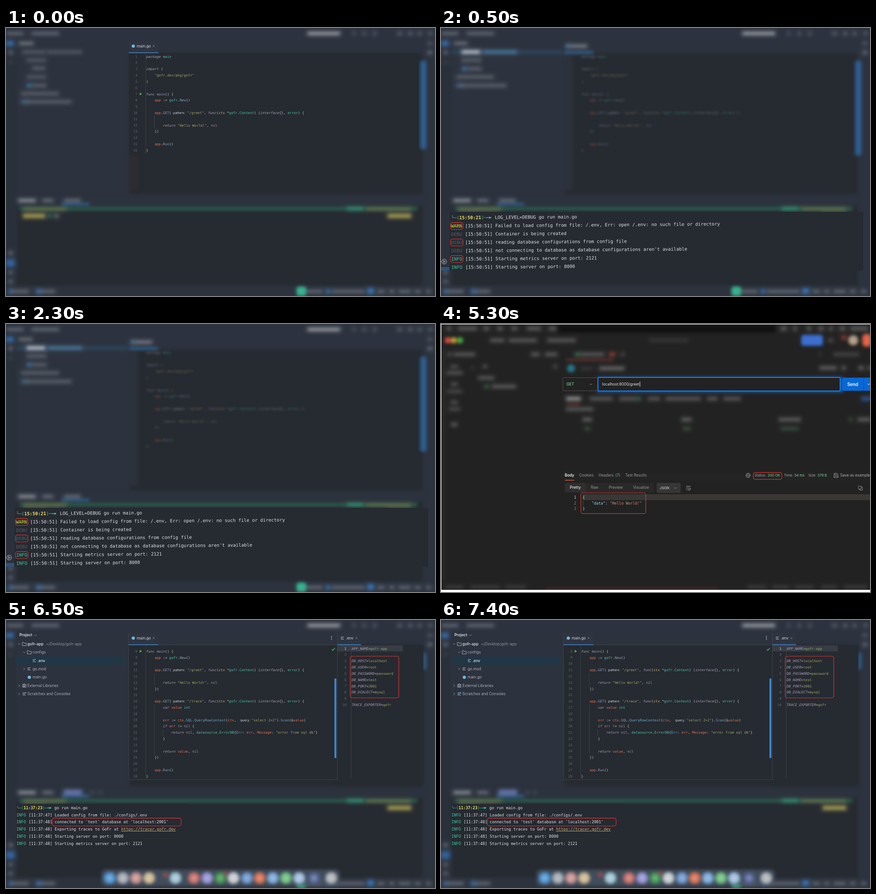
Recreate the animation shown at these times as an HTML page. Size 947 by 592 pixels, loop 8 s.

```html
<!DOCTYPE html>
<html lang="en">
<head>
<meta charset="utf-8">
<title>Go service walkthrough</title>
<style>
  html, body { margin: 0; width: 100%; height: 100%; overflow: hidden; background: #2d333e; }
  svg { position: absolute; left: 0; top: 0; width: 947px; height: 592px; }
  text { white-space: pre; font-family: Inter, sans-serif; }
  .mono, .mono text { font-family: "DejaVu Sans Mono", monospace; }
  .hint { font: 7.2px Inter, sans-serif; }
  .soft { filter: blur(3.5px); }
  .code-soft { filter: blur(2.6px); opacity: .6; }
</style>
</head>
<body>
<script>
const LOOP = 8000;
const PANEL = '#2d333e', EDITOR = '#262a31', RED = '#e03535', BLUE = '#3d86cc';
const GREY = '#9299a5', TEXT = '#c9ced6';
const INK = {
  k: '#aaa0b4', w: '#bcc2cd', o: '#e2734f', g: '#4ac6a8', y: '#a3a867',
  b: '#8b9fbd', c: '#d0b36c', p: '#d2d6dd', l: '#a39aad', m: '#6dabc9'
};

// Drawing helpers; text is placed by the middle of its capitals.
const esc = s => String(s).replace(/&/g, '&amp;').replace(/</g, '&lt;');
const rect = (x, y, w, h, fill, more = '') =>
  `<rect x="${x}" y="${y}" width="${w}" height="${h}" fill="${fill}" ${more}/>`;
const text = (x, y, s, fill = TEXT, size = 8.3, more = '') =>
  `<text x="${x}" y="${y + size * .36}" font-size="${size}" fill="${fill}" ${more}>${esc(s)}</text>`;
const mono = (x, y, s, fill, size, more = '') => text(x, y, s, fill, size, `class="mono" ${more}`);
const path = (d, stroke = GREY, w = 1, more = 'fill="none"') =>
  `<path d="${d}" stroke="${stroke}" stroke-width="${w}" ${more}/>`;
const dot = (x, y, r, fill, more = '') => `<circle cx="${x}" cy="${y}" r="${r}" fill="${fill}" ${more}/>`;
const outline = (x, y, w, h) => rect(x, y, w, h, 'none', `rx="4" stroke="${RED}" stroke-width="1.2"`);
const soft = (...parts) => `<g class="soft">${parts.join('')}</g>`;
const down = (x, y, c = GREY, r = 2.5) => path(`M${x - r} ${y - r / 2}l${r} ${r}l${r} ${-r}`, c);
const right = (x, y) => path(`M${x - 1.2} ${y - 2.5}l2.5 2.5l-2.5 2.5`);
const lines = (x, y) => path(`M${x} ${y - 2.5}h7M${x} ${y}h5M${x} ${y + 2.5}h7`, '#aeb4be');
const folder = (x, y) => path(`M${x} ${y - 3.5}h3l1.4 1.6h4.4v5.6h-8.8z`, '#aeb4be');
const cross = (x, y) => path(`M${x - 2} ${y - 2}l4 4m0 -4l-4 4`, '#858c98', .8);

// Smudges on one row, given as "from-to" spans.
const smudge = (y, spans, fill = '#8d939e', alpha = .42, h = 7) => spans.split(' ').map(s => {
  const [a, b] = s.split('-').map(Number);
  return rect(a - 7, y - h / 2 - 6, b - a + 14, h + 12, fill, `rx="8" opacity="${alpha * .17}"`) +
    rect(a, y - h / 2, b - a, h, fill, `rx="3" opacity="${alpha}"`);
}).join('');

// "^k" switches ink, "^p@369" also jumps to an x position.
function inked(x, y, src, size = 7.67) {
  const spans = src.split(/(?=\^\w)/).map(part => {
    const [, key, at, body] = part.match(/^\^(\w)(?:@(\d+))?([^]*)$/);
    return `<tspan fill="${INK[key]}"${at ? ` x="${at}"` : ''}${key == 'k' ? ' font-style="italic"' : ''}` +
      `${key == 'p' ? ' class="hint"' : ''}>${esc(body)}</tspan>`;
  }).join('');
  return `<text class="mono" x="${x}" y="${y + size * .36}" font-size="${size}">${spans}</text>`;
}

const STEP = 13.8, CHAR = 4.617;
const rowNumbers = (from, to, x, y) => {
  let out = '';
  for (let n = from; n <= to; n++)
    out += mono(x, y + (n - from) * STEP, n, '#626a77', 7.4, 'text-anchor="end"');
  return out;
};
const listing = (rows, first, y) => rows.map(([n, indent, src]) =>
  inked(309.6 + indent * CHAR, y + (n - first) * STEP, src)).join('');

const handler = route => `^oapp^w.^bGET^w(^p@369pattern:^y@400"${route}"^w, ^kfunc^w(^cctx ^w*^ggofr.Context^w) (^kinterface^w{}, ^gerror^w) {`;
const MAIN = '^kfunc ^bmain^w() {', NEW = '^oapp ^w:= ^ggofr^w.^bNew^w()';
const HELLO = '^kreturn ^y"Hello World!"^w, ^lnil', RUN = '^oapp^w.^bRun^w()';
const SHORT = [
  [1, 0, '^kpackage ^gmain'], [3, 0, '^kimport ^w('], [4, 4, '^y"gofr.dev/pkg/gofr"'], [5, 0, '^w)'],
  [7, 0, MAIN], [8, 4, NEW], [10, 4, handler('/greet')], [12, 8, HELLO], [13, 4, '^w})'],
  [15, 4, RUN], [16, 0, '^w}']
];
const LONG = [
  [8, 0, MAIN], [9, 4, NEW], [11, 4, handler('/greet')], [13, 8, HELLO], [14, 4, '^w})'],
  [16, 4, handler('/trace')], [17, 8, '^kvar ^ovalue ^gint'],
  [19, 8, '^oerr ^w:= ^octx^w.^mSQL^w.^mQueryRowContext^w(^octx^w, ^p@517query:^y@542"select 2+2"^w).^mScan^w(&^ovalue^w)'],
  [20, 8, '^kif ^oerr ^w!= ^lnil ^w{'],
  [21, 12, '^kreturn ^lnil^w, ^gdatasource^w.^gErrorDB^w{^mErr^w: ^oerr^w, ^oMessage^w: ^y"error from sql db"^w}'],
  [22, 8, '^w}'], [24, 8, '^kreturn ^ovalue^w, ^lnil'], [25, 4, '^w})'], [27, 4, RUN], [28, 0, '^w}']
];

const play = y => `<path d="M295 ${y - 3}l5.5 3l-5.5 3z" fill="#4fa964"/>`;
const fileTab = () => rect(271, 29, 65.5, 26, '#2f3540') + dot(281, 40, 3.6, '#74b9dc') +
  text(288.5, 40, 'main.go', '#d5dae2') + cross(326, 40) + rect(271, 53.8, 65.5, 1.6, BLUE);

// Out-of-focus editor window.
const ide = (tree, scrollEnd) => rect(0, 0, 947, 592, PANEL) + soft(
  rect(273, 57, 647, 309, EDITOR), rect(24, 393, 896, 176, EDITOR),
  rect(0, 24, 22, 545, '#2a303a'), rect(24, 368, 900, 2, '#282d36'),
  smudge(12, '2-38 57-117', GREY, .4), smudge(12, '666-737', '#d0d4da', .55),
  smudge(12, '766-770 788-794 811-817 864-874 888-897 909-917 933-941', GREY, .35),
  smudge(34, '0-17', '#3b73b5', .75, 12), smudge(54, '5-15 931-941', GREY, .4, 8),
  smudge(75, '6-14', GREY, .12), smudge(34, '931-941', GREY, .3),
  tree,
  rect(914, 72, 14, scrollEnd - 72, '#30679f', 'rx="5" opacity=".85"'),
  smudge(381, '28-65', '#c2c6ce', .5), smudge(381, '81-104 129-164', GREY, .45),
  rect(122, 387, 62, 4, '#356eaa'),
  rect(30, 395, 878, 8, '#2e715b', 'opacity=".7"'),
  smudge(400, '40-133 796-893', '#989254', .4), smudge(399, '754-788', '#39a37f', .6, 8),
  smudge(415, '38-86 843-894', '#c4b75b', .7, 9), smudge(415, '92-101', '#319b7c', .5),
  smudge(415, '106-117', '#9da2ab', .35, 9),
  smudge(497, '5-15', GREY, .4, 9), smudge(519, '0-19', '#356eb0', .75, 16),
  smudge(540, '5-15', GREY, .35, 9), smudge(560, '5-15', GREY, .35, 9),
  smudge(582, '11-50 74-108 664-698 720-791 820-836 846-857 867-893 903-915 928-938', GREY, .42),
  smudge(582, '6-12 66-76 706-716', '#407fc0', .65, 9), smudge(581, '798-812', '#3d80c9', .75, 12),
  rect(641, 571, 22, 21, '#37b18e', 'rx="6"')
);

function editorScene() {
  const tree = smudge(34, '29-60', '#b5bac3', .4) + smudge(53, '36-87 92-167', GREY, .32) +
    smudge(71, '46-88', GREY, .3) + smudge(89, '58-86', GREY, .35) + smudge(108, '46-88', GREY, .3) +
    smudge(127, '58-89', GREY, .35) + smudge(127, '47-55', '#4b90c4', .7) +
    smudge(145, '34-116', GREY, .36) + smudge(163, '45-144', GREY, .38) + smudge(163, '34-46', '#6493bd', .45);
  return ide(tree, 268) + rect(271, 55, 640, 225, EDITOR) + rect(272, 280, 22, 78, '#332f34', 'class="soft" opacity=".55"') +
    fileTab() + path('M308.3 56V279', '#3d434d') + path('M327.5 194V221', '#454b55') +
    rowNumbers(1, 16, 290, 63) + play(145.8) + listing(SHORT, 1, 63);
}

// Shell prompt with an arrow.
function prompt(x, y, size, time, cmd) {
  const cw = size * .602, tip = x + cw * 14.8;
  return mono(x, y, '└─(', '#43c7a5', size) +
    mono(x + cw * 3, y, time, '#eee06a', size, 'font-weight="700"') +
    mono(x + cw * 11, y, ')──', '#43c7a5', size) +
    `<path d="M${tip} ${y + .6}l-5.5 -2.8l1.5 2.8l-1.5 2.8z" fill="#43c7a5"/>` +
    path(`M${x + cw * 13} ${y + .6}H${tip - 3}`, '#43c7a5') + mono(x + cw * 16, y, cmd, '#dfe2e7', size);
}
const LEVEL = { WARN: '#e9dd2e', DEBU: '#555c67', INFO: '#3fc9a1' };
const log = (x, y, size, level, stamp, msg) => mono(x, y, level, LEVEL[level], size) +
  mono(x + size * .602 * 5.15, y, `[${stamp}] ${msg}`, '#dfe2e7', size);

function runScene() {
  const tree = smudge(34, '29-58', '#b5bac3', .35) + rect(24, 48, 244, 10, '#2c4f70', 'opacity=".55"') +
    smudge(53, '46-86', '#dfe4ea', .65, 8) + smudge(53, '94-167', '#5d94bd', .55) +
    smudge(71, '46-88', GREY, .36) + smudge(90, '58-89', GREY, .36) + smudge(90, '47-55', '#4b90c4', .7) +
    smudge(108, '34-116', GREY, .36) + smudge(127, '45-144', GREY, .38) + smudge(127, '34-46', '#6493bd', .45) +
    smudge(40, '286-322', '#c2c6ce', .4) + smudge(40, '276-284', '#74b9dc', .55) +
    rect(272, 52, 64, 5, '#326a9f') + rect(273, 60, 18, 298, '#2c313a');
  const msgs = [
    ['WARN', 'Failed to load config from file: /.env, Err: open /.env: no such file or directory'],
    ['DEBU', 'Container is being created'],
    ['DEBU', 'reading database configurations from config file'],
    ['DEBU', "not connecting to database as database configurations aren't available"],
    ['INFO', 'Starting metrics server on port: 2121'],
    ['INFO', 'Starting server on port: 8000']
  ];
  const rows = msgs.map(([level, msg], i) => log(22.3, 437.3 + i * 18.25, 10.05, level, '15:50:51', msg));
  return ide(tree, 282) + `<g class="code-soft">${listing(SHORT, 1, 63)}</g>` +
    rect(19, 406, 913, 130, EDITOR) + rect(0, 407, 19, 129, '#2b313b') + rect(0, 528, 18, 8, '#31527a') +
    path('M4.2 511h5.6l3 5l-3 5h-5.6l-3 -5z', '#b9bec7') + path('M5.5 513.5l4 2.5l-4 2.5z', '#b9bec7') +
    `<g transform="rotate(-.45 20 470)">${prompt(22.5, 419, 10.05, '15:50:21', 'LOG_LEVEL=DEBUG go run main.go')}${rows.join('')}</g>` +
    [0, 2, 4].map(i => outline(21, 429.7 + i * 18.25, 27.5, 15.3)).join('');
}

function requestScene() {
  const G = '#9a9a9a', GREEN = '#6bc48b', DIM = '#9b9b9b';
  const stat = (x, label, vx, value) =>
    text(x, 334.7, label, '#a6a6a6', 7.6) + text(vx, 334.7, value, GREEN, 7.6, 'font-weight="500"');
  const blur = soft(
    rect(258, 2, 480, 17, '#111'), rect(2, 55, 8, 510, '#2a2a2a'),
    smudge(10, '13-23 38-79 94-106 124-136 156-168 190-220 238-254', G, .36, 8),
    smudge(10, '750-763 778-785 808-817 833-844 857-864 880-892 904-942', G, .36, 9),
    dot(15, 36, 7, '#d84c42'), dot(28, 36, 7, '#c09a37'), dot(42, 36, 7, '#4ba943'),
    smudge(36, '109-139 150-211 235-297', G, .36, 8), smudge(36, '460-545', G, .15),
    smudge(36, '855-865', G, .3), smudge(30, '885-894', '#d6533c', .6),
    rect(795, 24, 48, 24, '#3b70d2', 'rx="5"'), dot(910, 36, 11, '#b5a089'), rect(930, 22, 20, 28, '#e76345', 'rx="8"'),
    smudge(67, '16-22 29-75 199-217 230-256', G, .36, 8), smudge(67, '310-360', G, .36, 8),
    smudge(67, '296-308', '#4a9b69', .55), smudge(67, '372-384', '#bd4c3b', .55, 9),
    smudge(67, '396-406 836-838 867-922', G, .24), rect(276, 78, 104, 3, '#a64535', 'opacity=".75"'),
    dot(287, 98, 9, '#27758a'), smudge(98, '308-335', G, .13), smudge(98, '350-404', G, .45, 8),
    smudge(97, '836-873 885-893 922-933 943-950', G, .4, 8),
    smudge(94, '21-37 92-102 248-256', G, .28, 8), smudge(108, '13-47', G, .35),
    smudge(97, '68-73', G, .14), smudge(119, '82-117', G, .34, 8), smudge(138, '113-165', G, .38, 8),
    smudge(138, '95-106', '#4a9b69', .4), smudge(133, '22-36', G, .3, 8), smudge(149, '14-46', G, .25),
    smudge(173, '22-36', G, .3, 8), smudge(188, '18-42', G, .27), smudge(222, '22-36', G, .33, 9),
    smudge(165, '277-308', '#d5d5d5', .5, 8), smudge(165, '329-378 394-430 457-483 496-573 588-610 624-661', G, .34, 8),
    smudge(165, '432-441', '#4a9b69', .5), smudge(165, '928-950', '#356bc4', .55, 9),
    rect(278, 176, 28, 3, '#a64535', 'opacity=".7"'), smudge(188, '276-336', G, .34, 8),
    smudge(211, '313-333 531-553 746-794 920-948', G, .4, 8), smudge(211, '901-907', '#57905f', .4),
    smudge(231, '317-329 534-551 750-789', '#55845f', .36),
    smudge(581, '11-49 66-129 142-188 677-718 732-768 780-823 840-874 890-940', G, .17),
    rect(230, 584, 382, 3, '#8d4134', 'opacity=".6"'),
    rect(343, 117, 546, 34, '#1769cf', 'rx="5" opacity=".75"'),
    rect(266, 328, 690, 18, '#292929', 'opacity=".5"')
  );
  const tabs = [[339, 'Raw'], [386, 'Preview'], [441.5, 'Visualize']];
  return rect(0, 0, 947, 592, '#222222') + blur +
    rect(269, 118.5, 77, 29, '#222', 'rx="2" stroke="#505050"') +
    text(277, 133, 'GET', GREEN, 8.4, 'font-weight="600"') + down(331, 133, DIM) +
    rect(346.5, 118, 534.5, 30, '#222', 'rx="2" stroke="#1680f2" stroke-width="2"') +
    text(355.7, 133, 'localhost:8000/greet', '#e6e6e6', 8.3) + rect(438.7, 127.5, .9, 11, '#fff') +
    rect(885.5, 118.5, 66, 29, '#0768d5', 'rx="3"') + rect(932.5, 118.5, 1, 29, '#0553ac') +
    text(896.7, 133, 'Send', '#fff', 9.8, 'font-weight="600"') + down(944, 133, '#fff') +
    text(273.2, 334.3, 'Body', '#f0f0f0', 8.3, 'font-weight="600"') + rect(273.5, 344.5, 20.5, 1.3, '#ee6040') +
    text(305, 334.3, 'Cookies', DIM) + text(348, 334.3, 'Headers', DIM) + text(384.8, 334.3, '(7)', GREEN) +
    text(406.7, 334.3, 'Test Results', DIM) +
    dot(678, 334.3, 4.7, 'none', `stroke="${DIM}"`) +
    path('M673.3 334.3h9.4M678 329.6c-3 3 -3 6.4 0 9.4c3 -3 3 -6.4 0 -9.4', DIM, .8) +
    stat(692.5, 'Status:', 721, '200 OK') + stat(757, 'Time:', 779.7, '34 ms') + stat(811, 'Size:', 831, '379 B') +
    outline(689.5, 328.2, 63, 15) +
    path('M867.5 330h6.5l2.5 2.5v6.5h-9zM869.5 330v3h4v-3M869.5 339v-3.5h5v3.5', DIM, .9) +
    text(881.3, 334.3, 'Save as example', '#b0b0b0', 8.25) +
    rect(273.5, 351, 196.5, 21, '#292929', 'rx="2"') + rect(273.5, 351, 46, 21, '#2f2f2f', 'rx="2"') +
    text(296.5, 361.5, 'Pretty', '#f0f0f0', 8.3, 'text-anchor="middle" font-weight="500"') +
    tabs.map(([x, s]) => text(x, 361.5, s, DIM, 8.3, 'text-anchor="middle"')).join('') +
    rect(476, 351, 53, 22, '#363636', 'rx="2"') + text(482.7, 362.3, 'JSON', '#b8b8b8', 7.7, 'font-weight="600"') + down(517, 362.3, DIM) +
    path('M541 358.5h10M541 362.3h7.5q2.5 0 2.5 2t-2.5 2h-2.5m1.6 -1.7l-1.7 1.7l1.7 1.7M541 366.3h3', '#b0b0b0') +
    path('M921.5 358h6v6.5h-6zM924 364.5v2.5h6.5v-6.5h-3', DIM, .9) +
    rect(312.5, 376, 634.5, 13, '#3a3734') +
    [1, 2, 3].map(n => mono(298.5, 370.3 + n * 12.6, n, n == 1 ? '#d0d0d0' : '#858585', 8.36, 'text-anchor="end"')).join('') +
    path('M313.5 390V402', '#505050', .8) +
    mono(312.4, 382.9, '{', '#dcdcdc', 8.36) + mono(312.4, 408.1, '}', '#dcdcdc', 8.36) +
    `<text class="mono" x="332.6" y="398.5" font-size="8.36" fill="#dcdcdc"><tspan fill="#9cdcfe">"data"</tspan>: <tspan fill="#ce9178">"Hello World!"</tspan></text>` +
    outline(308.7, 373, 143.3, 45.7) +
    rect(0, 0, 947, 1, '#fff') + rect(0, 0, 1, 592, '#fff') + rect(0, 587.3, 947, 5, '#fff');
}

function traceScene() {
  const env = ['APP_NAME=gofr-app', '', 'DB_HOST=localhost', 'DB_USER=root', 'DB_PASSWORD=password',
    'DB_NAME=test', 'DB_PORT=2001', 'DB_DIALECT=mysql', '', 'TRACE_EXPORTER=gofr'];
  const envRows = env.map((s, i) => {
    const [key, value] = s.split('=');
    return s && inked(763, 63 + i * STEP, `^k${key}^w=^y${value}`);
  }).join('');
  const tree = rect(23, 80.5, 239, 18, '#213746') +
    text(29.5, 33.5, 'Project', '#d9dee6', 8.3, 'font-weight="600"') + down(65, 33.5) +
    down(29, 53) + folder(36, 53) + text(47.3, 53, 'gofr-app', '#cbd2dc', 8.3, 'font-weight="600"') + text(88.5, 53, '~/Desktop/gofr-app', '#8d949f') +
    down(40, 71.3) + folder(47, 71.3) + text(58.7, 71.3, 'configs', '#aab1bc') +
    lines(59, 89.7) + text(69.5, 89.7, '.env', '#e0e5ec', 8.3, 'font-weight="500"') +
    right(40, 108) + lines(47.5, 108) + text(58.7, 108, 'go.mod', '#aab1bc') +
    dot(51.5, 126.5, 3.6, '#74b9dc') + text(58.7, 126.5, 'main.go', '#aab1bc') +
    right(29, 145) + path('M36.5 142.5h2.5v6h-2.5zM39 141h2.7v7.5H39zM41.7 142.5h2.6v6h-2.6z', '#aeb4be', .9) + text(47.3, 145, 'External Libraries', '#aab1bc') +
    right(29, 163.3) + lines(36.5, 163.3) + dot(43, 161, 1.8, '#4a94ca') + text(47.3, 163.3, 'Scratches and Consoles', '#aab1bc');
  const dock = [
    [229, '#519de0'], [258, '#aeb4bb'], [287, '#d59692'], [316, '#d8c295'], [374, '#a9cfdf'],
    [415, '#d5716a'], [444, '#9c98df'], [473, '#439c52'], [502, '#d4d7da'], [532, '#719fda'], [560, '#e6714f'],
    [589, '#80b1e4'], [618, '#70ca80'], [647, '#aac8e8'], [680, '#59669d'], [718, '#b9bdc1']
  ];
  const logs = [
    'Loaded config from file: ./configs/.env', "connected to 'test' database at 'localhost:2001'",
    'Exporting traces to GoFr at ', 'Starting server on port: 8000', 'Starting metrics server on port: 2121'
  ];
  const rows = logs.map((msg, i) => log(23, 430.5 + i * 15.75, 8.7, 'INFO', i ? '11:37:48' : '11:37:47', msg)).join('');
  const marks = soft(
    smudge(381, '128-168', '#667fc7', .55, 12), smudge(381, '187-194 205-211', GREY, .2),
    rect(211, 551, 526, 36, '#465362', 'rx="9" opacity=".85"'),
    dock.map(([x, c]) => dot(x, 570, 13, c, 'opacity=".9"') + dot(x, 570, 6, '#fff', 'opacity=".28"')).join(''),
    dot(352, 563, 6, '#b14c4c', 'opacity=".7"'), dot(484, 560, 5, '#b84d4d', 'opacity=".7"')
  );
  return ide('', 110) + rect(731, 56, 190, 308, EDITOR, 'class="soft"') + marks +
    rect(22, 28, 240, 142, PANEL) + tree +
    rect(270, 28, 514, 27, PANEL) + rect(270, 55, 651, 297, EDITOR) +
    path('M270.5 28V352.5H731.5V28M336 55H784', '#414750', .9) + fileTab() +
    [36.5, 39.7, 42.9].map(y => dot(718.5, y, .9, TEXT)).join('') +
    path('M719 64.5l2.5 2.7l4.5 -5.5', '#49ad61', 1.6) +
    rect(732, 29, 51, 26, '#2f3540') + lines(739, 40) + text(750.3, 40, '.env', '#d5dae2') + cross(773.5, 40) + rect(732, 53.8, 51.5, 1.6, BLUE) +
    path('M308.3 56V349', '#3d434d') + path('M327.5 118V145M327.5 187V297M346 242V255', '#454b55', .8) +
    rowNumbers(8, 28, 290, 69) + play(69) + listing(LONG, 8, 69) +
    rect(725, 129, 4.3, 176, BLUE, 'rx="1.5"') +
    rect(732, 56, 144, 13.5, '#373c45') + path('M762 56V350', '#3d434d') +
    rowNumbers(1, 10, 751.5, 63) + mono(751.5, 63, 1, '#c5cbd5', 7.4, 'text-anchor="end"') + envRows +
    outline(760, 80, 107, 92) +
    rect(22, 406, 380, 95, EDITOR) + prompt(23, 414.5, 8.7, '11:37:23', 'go run main.go') + rows +
    mono(254.3, 462, 'https://tracer.gofr.dev', '#c9b477', 8.7, 'text-decoration="underline"') +
    outline(102.5, 437.7, 284, 17.3);
}

// Hard cuts between scenes: draw, start, end.
const SCENES = [
  [editorScene, 0, 500], [runScene, 500, 3500], [requestScene, 3500, 6500], [traceScene, 6500, LOOP]
];
const views = SCENES.map(([draw]) => {
  document.body.insertAdjacentHTML('beforeend', `<svg viewBox="0 0 947 592">${draw()}</svg>`);
  return document.body.lastElementChild;
});
views.forEach((view, i) => {
  const [, from, to] = SCENES[i], easing = 'steps(1, end)';
  view.animate([
    { offset: 0, opacity: from ? 0 : 1, easing },
    { offset: from / LOOP, opacity: 1, easing },
    { offset: to / LOOP, opacity: 0, easing },
    { offset: 1, opacity: 0 }
  ], { duration: LOOP, iterations: Infinity });
});
</script>
</body>
</html>
```
